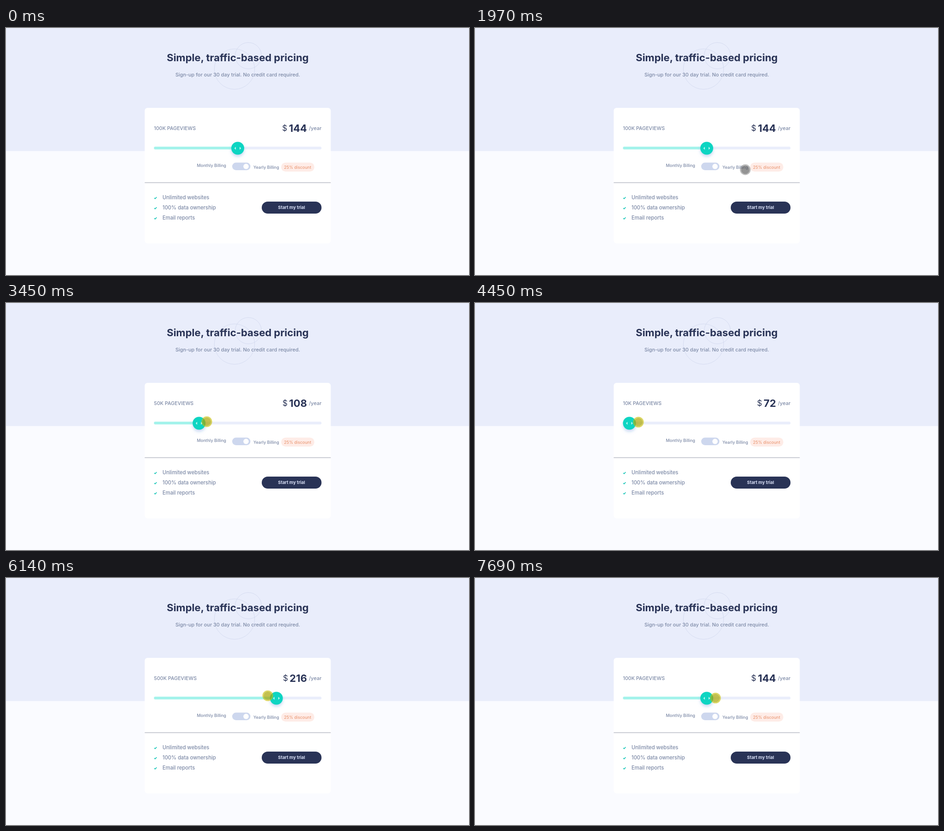
These frames come from a looping animation (1003x535 px, 8000 ms). An HTML page:

```html
<!DOCTYPE html>
<html lang="en">
<head>
<meta charset="utf-8">
<title>Pricing</title>
<style>
  html, body { margin: 0; width: 100%; height: 100%; overflow: hidden; background: #fafbff; }
  svg { display: block; width: 1003px; height: 535px; font: 500 11px Inter, sans-serif; fill: #7c89a6; }
  .dark { fill: #293356; }
  .small { font-size: 9px; }
  .list { font-size: 11.2px; }
  .check { fill: none; stroke: #10c4b5; stroke-width: 1.5; }
  #cursor circle { fill: rgba(90, 90, 90, .65); }
  #cursor circle + circle { fill: none; stroke: rgba(120, 120, 120, .5); stroke-width: 2.4; }
  #cursor.down circle { fill: rgba(168, 164, 0, .69); }
  #cursor.down circle + circle { fill: none; stroke: rgba(200, 190, 0, .62); }
</style>
</head>
<body>
<svg viewBox="0 0 1003 535">
  <defs>
    <filter id="shadow" x="-50%" y="-50%" width="200%" height="200%">
      <feDropShadow dx="0" dy="4" stdDeviation="3" flood-color="#8fb4e8" flood-opacity=".5"/>
    </filter>
  </defs>

  <rect width="1003" height="266.5" fill="#e9edfb"/>
  <g fill="none" stroke="#d6dcf1">
    <circle cx="495" cy="89" r="43.7"/>
    <circle cx="525" cy="60" r="28.5"/>
  </g>
  <text class="dark" x="502" y="72" text-anchor="middle" font-size="22" font-weight="700">Simple, traffic-based pricing</text>
  <text x="502" y="105" text-anchor="middle" font-size="10.9">Sign-up for our 30 day trial. No credit card required.</text>

  <rect x="300.5" y="173" width="403" height="293.5" rx="6" fill="#fff"/>
  <text id="views" x="320.5" y="221" font-size="10.7"></text>
  <text class="dark" x="652" y="225" text-anchor="end" font-size="22" font-weight="700"><tspan font-size="17" font-weight="400" dy="-2">$</tspan><tspan id="price" dx="3.5" dy="2"></tspan></text>
  <text x="683.5" y="221" text-anchor="end">/year</text>

  <rect x="320.5" y="257" width="363" height="6" rx="3" fill="#eaeefb"/>
  <rect id="fill" x="320.5" y="257" height="6" rx="3" fill="#a4f3eb"/>
  <g id="thumb">
    <circle r="14" fill="#10d5c2" filter="url(#shadow)"/>
    <path d="M-7.3 0l3.2-3.2v6.4zM7.3 0l-3.2-3.2v6.4z" fill="#c4f7f1"/>
  </g>

  <text class="small" x="413.5" y="301">Monthly Billing</text>
  <rect x="490" y="291.5" width="39.5" height="16.5" rx="8.25" fill="#cdd7ee"/>
  <circle cx="520" cy="299.8" r="5.8" fill="#fff"/>
  <text class="small" x="536" y="305">Yearly Billing</text>
  <rect x="596" y="291.5" width="72" height="19.5" rx="9.75" fill="#feece7"/>
  <text class="small" x="631.7" y="305" text-anchor="middle" style="fill:#e88f68;font-weight:400">25% discount</text>

  <rect x="300.5" y="334" width="403" height="2" fill="#cbcdd5"/>
  <g class="list">
    <text x="339" y="371">Unlimited websites</text>
    <text x="339" y="393">100% data ownership</text>
    <text x="339" y="415">Email reports</text>
  </g>
  <path class="check" d="M321.3 368l1.7 1.8 3.4-3.6m-5.1 23.8l1.7 1.8 3.4-3.6m-5.1 23.8l1.7 1.8 3.4-3.6"/>
  <rect x="554" y="376" width="129.5" height="26" rx="13" class="dark"/>
  <text x="618.5" y="392" text-anchor="middle" font-size="9.3" font-weight="700" style="fill:#dbe2f8">Start my trial</text>

  <g id="cursor"><circle r="9.2"/><circle r="10.4"/></g>
</svg>
<script>
const $ = id => document.getElementById(id);
const LOOP = 8000, PRESS = 2710, MIN = 334.5, GAP = 83.75;
const plans = [["10K", 72], ["50K", 108], ["100K", 144], ["500K", 216], ["1M", 324]];

// Pointer moves: first step, last step, step count, end x, end y
const moves = [
  [190, 260, 2, 958, 527],
  [460, 1090, 10, 859, 415],
  [1290, 1290, 1, 830, 406],
  [1360, 1500, 3, 690, 363],
  [1700, 2240, 9, 502, 262],
  [2840, 3450, 10, 435, 257],
  [3580, 3580, 1, 431, 257],
  [3780, 3920, 3, 379, 257],
  [4120, 4190, 2, 346, 258],
  [4450, 4450, 1, 354, 258],
  [4520, 4650, 3, 405, 257],
  [4850, 5260, 6, 471, 255],
  [5660, 6400, 11, 622, 255],
  [6470, 6880, 7, 662, 255],
  [7010, 7220, 4, 638, 256],
  [7290, 7350, 2, 588, 258],
  [7550, 7690, 3, 521, 260]
];

function pointer(t) {
  let x = 976, y = 533;
  for (const [from, to, n, endX, endY] of moves) {
    if (t < from) break;
    const gap = (to - from) / (n - 1) || 1;
    const k = Math.min(1, (Math.floor((t - from) / gap + .01) + 1) / n);
    x += (endX - x) * k;
    y += (endY - y) * k;
  }
  return [x, y];
}

function draw(t) {
  const [x, y] = pointer(t), down = t >= PRESS;
  const step = down ? Math.max(0, Math.min(4, Math.round((x - MIN) / GAP))) : 2;
  const thumbX = MIN + step * GAP;
  $("views").textContent = plans[step][0] + " PAGEVIEWS";
  $("price").textContent = plans[step][1];
  $("fill").setAttribute("width", thumbX - 320.5);
  $("thumb").setAttribute("transform", `translate(${thumbX} 260.5)`);
  $("cursor").setAttribute("transform", `translate(${x} ${y})`);
  $("cursor").setAttribute("class", down ? "down" : "");
  $("cursor").setAttribute("visibility", t < moves[0][0] ? "hidden" : "visible");
}

const start = performance.now();
function frame() {
  draw((performance.now() - start) % LOOP);
  requestAnimationFrame(frame);
}
frame();
</script>
</body>
</html>
```
